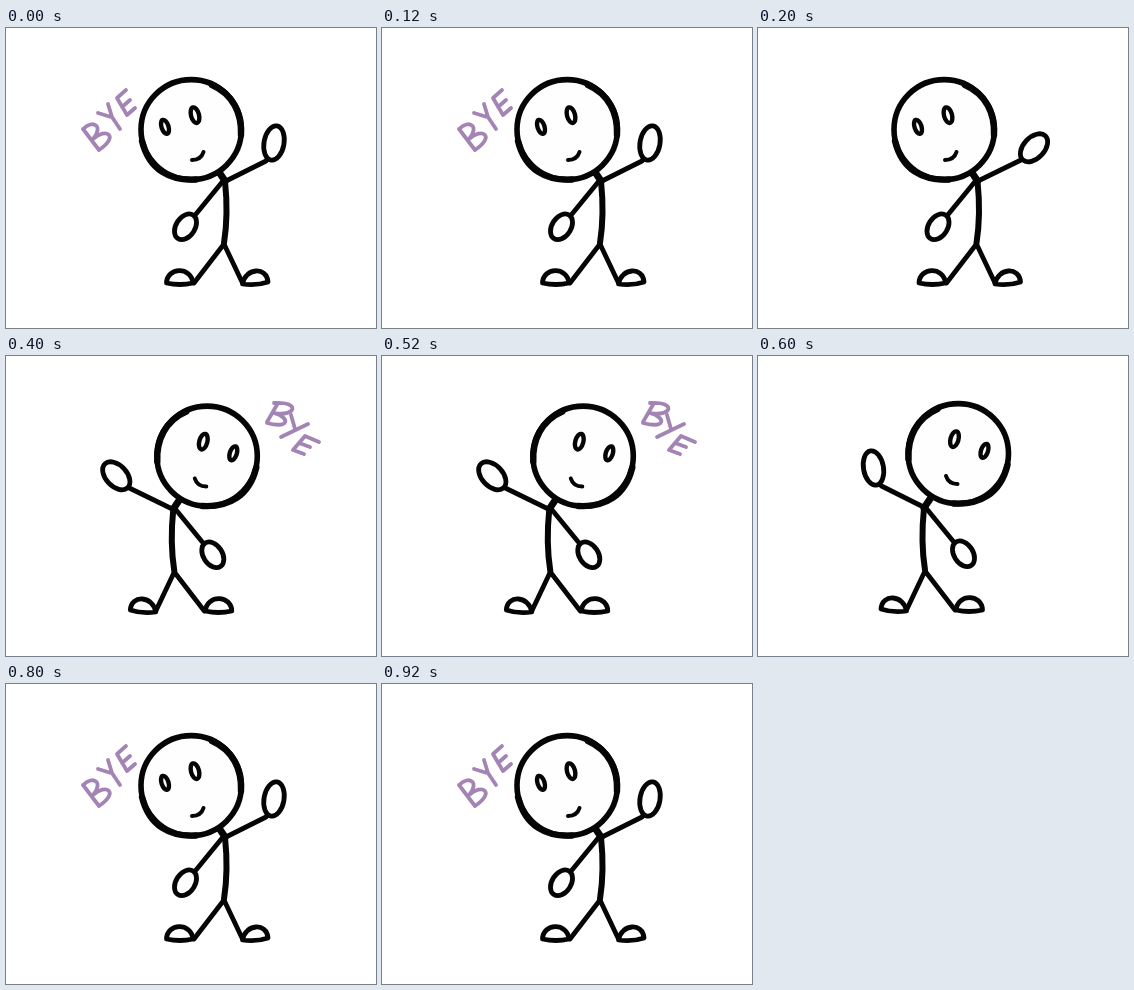
Recreate the animation shown at these times as an HTML page without scripts. Size 370 by 300 pixels, loop 1000 ms.

```html
<!DOCTYPE html>
<html lang="en">
<head>
<meta charset="utf-8">
<title>Waving goodbye</title>
<style>
  html, body { margin: 0; width: 100%; height: 100%; overflow: hidden; background: #fff; }
  svg { display: block; width: 100%; height: 100%; }
  .ink { fill: none; stroke: #050505; stroke-width: 4.8; stroke-linecap: round; stroke-linejoin: round; }
  .fill { fill: #fefefe; }
  .word { fill: none; stroke: #a384b4; stroke-width: 3.8; stroke-linecap: round; stroke-linejoin: round; }
  .pose { visibility: hidden; animation: 1s step-end infinite; }
  .right-up { animation-name: first; }
  .right-out { animation-name: second; }
  .left-out { animation-name: third; }
  .left-up { animation-name: fourth; }
  @keyframes first { 0%, 80% { visibility: visible; } 20%, 100% { visibility: hidden; } }
  @keyframes second { 0%, 40% { visibility: hidden; } 20% { visibility: visible; } }
  @keyframes third { 0%, 60% { visibility: hidden; } 40% { visibility: visible; } }
  @keyframes fourth { 0%, 80% { visibility: hidden; } 60% { visibility: visible; } }
</style>
</head>
<body>
<svg viewBox="0 0 370 300" role="img" aria-label="A stick figure waves: BYE">
  <defs>
    <g id="head" class="ink">
      <ellipse class="fill" cx="185.2" cy="101.6" rx="50.2" ry="50" stroke-width="5.6"/>
      <path d="M136 113C143 142 164 153 190 151.500M206 57C227 66 236 86 235 107" stroke-width="6.4"/>
      <ellipse cx="159" cy="98.800" rx="3.500" ry="7.200" transform="rotate(-18 159 98.800)" stroke-width="4.400"/>
      <ellipse cx="189" cy="87.200" rx="4" ry="8" transform="rotate(-15 189 87.200)" stroke-width="4.400"/>
      <path d="M186 132Q195 132 197.500 124" stroke-width="4"/>
    </g>

    <g id="body" class="ink">
      <path d="M213 144L219 153" stroke-width="7"/>
      <path d="M219 153Q222.500 187 218 215" stroke-width="6"/>
      <path d="M218 216L188 255M218 216L236.500 255M217 153L190 186"/>
      <path class="fill" d="M160.500 255C161 239 185 238 187 255Q174 258 160.500 255Z"/>
      <path class="fill" d="M236.500 256C239 240 261 238 262 254Q250 258 236.500 256Z"/>
      <ellipse class="fill" cx="179.500" cy="198.800" rx="9.500" ry="14" transform="rotate(33 179.500 198.800)"/>
    </g>

    <g id="up" class="ink">
      <path d="M220 153L260 133"/>
      <ellipse class="fill" cx="268" cy="115" rx="10" ry="17.300" transform="rotate(10 268 115)"/>
    </g>

    <g id="out" class="ink">
      <path d="M220 153L263 132"/>
      <ellipse class="fill" cx="276" cy="119.800" rx="10.500" ry="16.500" transform="rotate(43 276 119.800)"/>
    </g>
  </defs>

  <g class="pose right-up">
    <use href="#body"/>
    <use href="#up"/>
    <use href="#head"/>
    <g class="word">
      <path d="M77 101L93 122M77 101C87 91 98 98 87 111C100 99 114 108 93 122"/>
      <path d="M92 85L105 89M102 76L106 89L114 101"/>
      <path d="M120 62L111 70L121 87L129 80M116 79L124 72"/>
    </g>
  </g>

  <g class="pose right-out">
    <use href="#body" x=".5"/>
    <use href="#out"/>
    <use href="#head" x="1"/>
  </g>

  <g class="pose left-out">
    <g transform="translate(386.300 0) scale(-1 1)">
      <use href="#body"/>
      <use href="#out"/>
      <use href="#head" y="-1.500"/>
    </g>
    <g class="word">
      <path d="M272 47L261 66M268 47C294 45 291 61 268 57C285 62 283 73 261 67"/>
      <path d="M285 59L289 73M302 68L275 81"/>
      <path d="M313 86L299 80L287 94L298 98M293 87L304 91"/>
    </g>
  </g>

  <g class="pose left-up">
    <g transform="translate(385 -1) scale(-1 1)">
      <use href="#body"/>
      <use href="#up" x="1.500" y="-2"/>
      <use href="#head" x="-.5" y="-3"/>
    </g>
  </g>
</svg>
</body>
</html>
```
